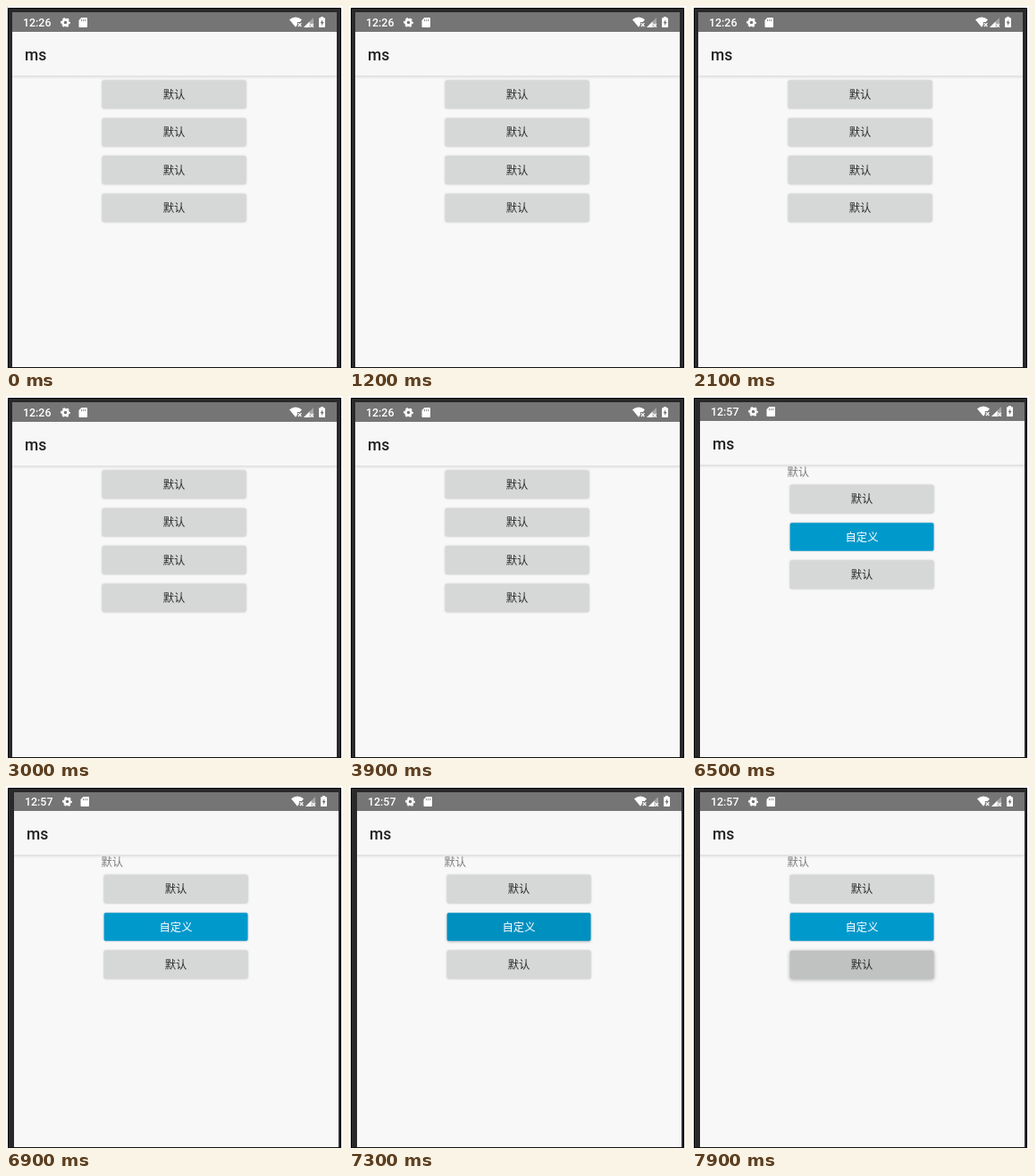
Write an HTML page that moves like this. It is 377 px wide and 406 px high and loops after 8 s.

```html
<!DOCTYPE html>
<html lang="zh-CN">
<head>
<meta charset="utf-8">
<style>
html, body { margin: 0; width: 100%; height: 100%; overflow: hidden; background: #fff; }
svg { display: block; width: 377px; height: 406px; }
.label { font: 12.3px "Noto Sans CJK SC", "Noto Sans CJK", sans-serif; }
.clock { font: 500 12.4px Roboto, sans-serif; fill: #fff; }
.title { font: 500 17.5px Roboto, sans-serif; fill: #212121; }
</style>
</head>
<body>
<svg viewBox="0 0 377 406">
  <defs>
    <linearGradient id="fade" x2="0" y2="1">
      <stop offset="0" stop-color="#000" stop-opacity=".11"/>
      <stop offset="1" stop-color="#000" stop-opacity="0"/>
    </linearGradient>
    <g id="icons" fill="#fff">
      <circle cx="66.5" cy="18.5" r="3.1" fill="none" stroke="#fff" stroke-width="2.6"/>
      <circle cx="66.5" cy="18.5" r="4.8" fill="none" stroke="#fff" stroke-width="1.3" stroke-dasharray="2.6 2.427" stroke-dashoffset="1.3"/>
      <path d="M84.4 13H90q1 0 1 1v9q0 1-1 1h-7.5q-1 0-1-1v-7z"/>
      <path d="M84.5 15v2.2M86.6 15v2.2M88.7 15v2.2" stroke="#757575" stroke-width=".8"/>
      <path d="M317 15.2q7-5.4 14 0l-2.2 2.7h-3v3.3L324 23.7z"/>
      <path d="M326.8 19.2l3.6 3.8m0-3.8l-3.6 3.8" stroke="#fff" stroke-width="1.2"/>
      <path d="M333 24l11-11v11z" opacity=".35"/>
      <path d="M333 24l6.6-6.6V24z"/>
      <path d="M340.4 19.8l3.6 3.8m0-3.8l-3.6 3.8" stroke="#fff" stroke-width="1.2"/>
      <path d="M352 13.2v-1.2h3v1.2h1.2q.8 0 .8.8v9.3q0 .8-.8.8h-5.4q-.8 0-.8-.8V14q0-.8.8-.8z"/>
      <path d="M354.2 15.2l-2.6 4h1.5v2.9l2.5-4h-1.4z" fill="#757575"/>
    </g>
  </defs>
  <rect x="1" y="2" width="374" height="404" fill="#000"/>
  <rect x="3" y="3" width="371" height="402" fill="#292929"/>
  <rect id="edge" x="1" y="0" width="1" height="406"/>
  <g id="stage"></g>
  <rect x="2" y="405" width="373" height="1" fill="#111"/>
</svg>
<script>
const LOOP = 8000, CUT = 5500;
const NS = "http://www.w3.org/2000/svg";
const stage = document.getElementById("stage");
const edge = document.getElementById("edge");

function add(parent, tag, attrs, text) {
  const el = document.createElementNS(NS, tag);
  for (const k in attrs) el.setAttribute(k, attrs[k]);
  if (text) el.textContent = text;
  parent.appendChild(el);
  return el;
}

function screen(x, lift, time) {
  const g = add(stage, "g", {});
  const box = (y, h, fill) => add(g, "rect", { x, y, width: 363, height: h, fill });
  box(7, 398, "#f8f8f8");
  box(29 - lift, 49, "#f7f7f7");
  box(78 - lift, 4, "url(#fade)");
  box(7, 22 - lift, "#757575");
  add(g, "use", { href: "#icons", x: x - 7, y: -lift });
  add(g, "text", { x: x + 12, y: 23 - lift, class: "clock" }, time);
  add(g, "text", { x: x + 14, y: 60.6 - lift, class: "title" }, "ms");
  return g;
}

function button(parent, x, y, text, blue) {
  const rect = add(parent, "rect", { x: x + 0.6, y: y + 0.5, width: 160.9, height: 31.6, rx: 1.8 });
  add(parent, "text", {
    x: x + 81, y: y + 20.9, class: "label", "text-anchor": "middle", fill: blue ? "#fff" : "#2b2b2b"
  }, text);
  const rest = blue ? [0, 153, 204] : [214, 215, 215];
  const down = blue ? [0, 135, 180] : [192, 193, 193];
  return level => {
    const rgb = rest.map((c, i) => Math.round(c + (down[i] - c) * level));
    rect.setAttribute("fill", `rgb(${rgb})`);
    rect.style.filter = `drop-shadow(0 ${0.5 + level}px ${0.8 + 1.2 * level}px rgba(0,0,0,${0.22 + 0.1 * level}))`;
  };
}

const first = screen(7, 0, "12:26");
const second = screen(9, 1, "12:57");
add(second, "text", { x: 106.5, y: 90, class: "label", fill: "#7b7b7b" }, "默认");

const plain = [83, 125.4, 167.8, 210.2].map(y => button(first, 107, y, "默认"));
const styled = [
  button(second, 109, 99.3, "默认"),
  button(second, 109, 141.7, "自定义", true),
  button(second, 109, 184.1, "默认")
];

// Each key is a time and the press level held from then on
const presses = new Map([
  [plain[2], [[1000, .5], [1100, 1], [1200, 0], [1500, .5], [1600, 1], [2100, 0],
              [2500, .5], [2600, 1], [3000, 0]]],
  [plain[3], [[3400, .5], [3500, 1], [3800, .4], [3900, 0],
              [4200, .5], [4300, 1], [4600, .4], [4700, 0]]],
  [styled[1], [[6600, .5], [6700, 1], [6800, .5], [6900, 0],
               [7100, .5], [7200, 1], [7300, .5], [7400, 0]]],
  [styled[2], [[7800, .5], [7900, 1]]]
]);

function held(keys, t) {
  let level = 0;
  for (const [at, value] of keys) if (t >= at) level = value;
  return level;
}

function draw(t) {
  first.style.display = t < CUT ? "" : "none";
  second.style.display = t < CUT ? "none" : "";
  edge.setAttribute("fill", held([[800, 1], [5300, 0], [6500, 1]], t) ? "#fff" : "#d8d8d8");
  for (const set of [...plain, ...styled]) set(held(presses.get(set) || [], t));
}

const start = performance.now();
function tick() {
  draw((performance.now() - start) % LOOP);
  requestAnimationFrame(tick);
}
draw(0);
requestAnimationFrame(tick);
</script>
</body>
</html>
```
